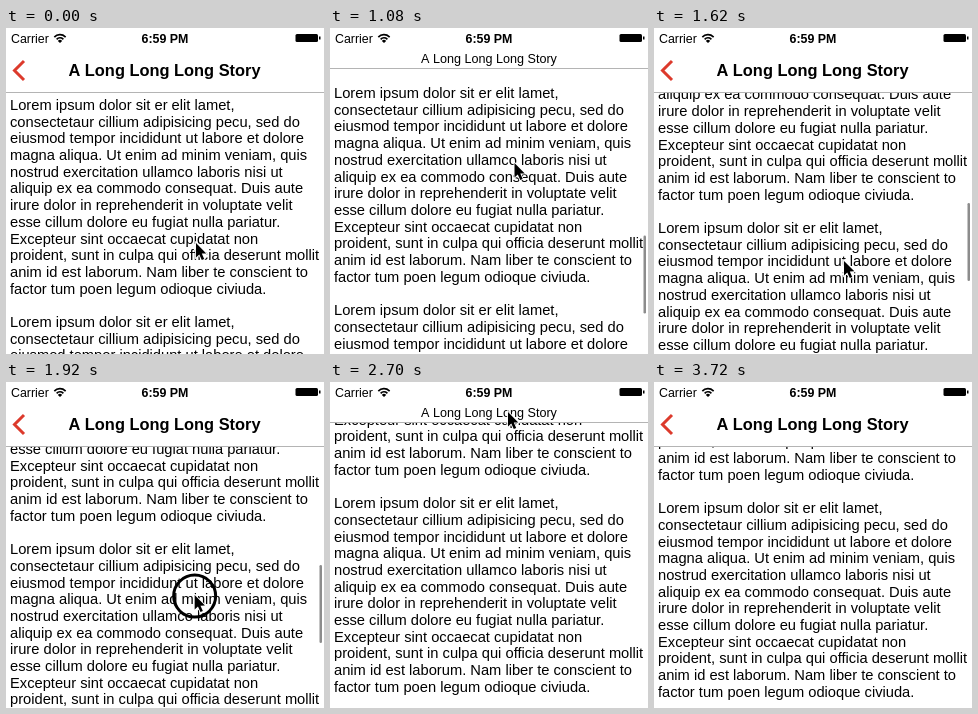
Write an HTML page with a canvas that moves like this. It is 318 px wide and 326 px high and loops after 3960 ms.

```html
<!DOCTYPE html>
<html lang="en">
<head>
<meta charset="utf-8">
<title>Collapsing navigation bar</title>
<style>
html, body { margin: 0; width: 100%; height: 100%; overflow: hidden; background: #fff; }
canvas { display: block; width: 318px; height: 326px; }
</style>
</head>
<body>
<canvas id="stage" width="318" height="326"></canvas>
<script>
const W = 318, H = 326, LOOP = 3960, STEP = 60;
const LINE = 16.7, PARAGRAPH = LINE * 13;
const BAR_OPEN = 64, BAR_CLOSED = 40;
const FONT = '"Liberation Sans", Arial, sans-serif';
const TITLE = 'A Long Long Long Story';
const ctx = document.getElementById('stage').getContext('2d');
const arrow = new Path2D('M0 0V14.5L3.3 11.5L5.8 17L8.2 16L5.8 10.6L10.3 10.4Z');

const story = [
  'Lorem ipsum dolor sit er elit lamet,',
  'consectetaur cillium adipisicing pecu, sed do',
  'eiusmod tempor incididunt ut labore et dolore',
  'magna aliqua. Ut enim ad minim veniam, quis',
  'nostrud exercitation ullamco laboris nisi ut',
  'aliquip ex ea commodo consequat. Duis aute',
  'irure dolor in reprehenderit in voluptate velit',
  'esse cillum dolore eu fugiat nulla pariatur.',
  'Excepteur sint occaecat cupidatat non',
  'proident, sunt in culpa qui officia deserunt mollit',
  'anim id est laborum. Nam liber te conscient to',
  'factor tum poen legum odioque civiuda.'
];

const dragUp = { from: 60, to: 600 };
const dragDown = { from: 1110, to: 1320 };
const flick = { from: 1800, to: 2160 };
const settle = { from: 2940, to: 3360 };

// Progress from 0 to 1 and the easings built on it.
const ramp = (t, from, to) => Math.min(1, Math.max(0, (t - from) / (to - from)));
const easeIn = (t, from, to, power = 2) => ramp(t, from, to) ** power;
const easeOut = (t, from, to) => 1 - (1 - ramp(t, from, to)) ** 2;
const smooth = (t, from, to) => {
  const p = ramp(t, from, to);
  return p * p * (3 - 2 * p);
};

// Baseline of the third paragraph's first line.
function scrollTop(t) {
  return 299
    - 229 * easeIn(t, dragUp.from, 1080, 1.46)
    + 135 * easeOut(t, 1080, 1560)
    - 296 * easeIn(t, flick.from, flick.to)
    - 18 * Math.sin(Math.PI * ramp(t, flick.to, 2640))
    + 5 * smooth(t, settle.from, settle.to);
}

function barBottom(t) {
  const closed = smooth(t, 540, 780) - smooth(t, 1290, 1570)
    + smooth(t, 2000, 2240) - smooth(t, settle.from, 3300);
  return BAR_OPEN - (BAR_OPEN - BAR_CLOSED) * closed;
}

function pointerAt(t) {
  const up = easeIn(t, dragUp.from, dragUp.to, 1.4);
  const down = smooth(t, dragDown.from, dragDown.to);
  const flung = easeIn(t, flick.from, flick.to);
  return {
    x: 190 - 5.5 * (up - down) - 12 * flung,
    y: 215 - 80 * up + 75 * down + 26 * smooth(t, 1400, 1680) - 206 * flung
      - 50 * ramp(t, settle.from, 3120)
  };
}

function text(string, x, y, size, weight = '', align = 'left') {
  ctx.font = `${weight} ${size}px ${FONT}`;
  ctx.textAlign = align;
  ctx.fillStyle = '#000';
  ctx.fillText(string, x, y);
}

function drawStory(top) {
  for (let p = -2; p < 2; p++) {
    story.forEach((line, i) => {
      const y = top + p * PARAGRAPH + i * LINE;
      if (y > 0 && y < H + 20) text(line, 4, Math.round(y), 14.7);
    });
  }
}

function drawIndicator(t, top) {
  ctx.globalAlpha = ramp(t, 60, 120) - ramp(t, 2340, 2580);
  ctx.fillStyle = '#8c8c8c';
  ctx.beginPath();
  ctx.roundRect(313.5, Math.min(183 + (172 - top) * 0.24, 245), 2.5, 78, 1.25);
  ctx.fill();
  ctx.globalAlpha = 1;
}

function drawStatusBar() {
  text('Carrier', 5, 14.5, 12.4);
  text('6:59 PM', 159, 14.5, 12.4, 'bold', 'center');

  ctx.strokeStyle = '#000';
  ctx.lineWidth = 1.7;
  const left = -Math.PI * 0.76, right = -Math.PI * 0.24;
  for (const radius of [4.6, 7.8]) {
    ctx.beginPath();
    ctx.arc(54, 14.5, radius, left, right);
    ctx.stroke();
  }
  ctx.beginPath();
  ctx.moveTo(54, 15);
  ctx.arc(54, 15, 3, left, right);
  ctx.fill();

  ctx.beginPath();
  ctx.roundRect(289.5, 6, 22.5, 8, 1.5);
  ctx.fill();
  ctx.fillRect(313, 8.5, 1.5, 3);
}

function drawBar(bottom) {
  ctx.fillStyle = '#fff';
  ctx.fillRect(0, 0, W, bottom);
  ctx.fillStyle = '#b4b4b4';
  ctx.fillRect(0, Math.round(bottom), W, 1);
  drawStatusBar();

  if (bottom < BAR_OPEN - 2) {
    text(TITLE, 159, 35 + (bottom - BAR_CLOSED) / 2, 12.6, '', 'center');
    return;
  }
  text(TITLE, 158.5, 48, 16.4, 'bold', 'center');
  ctx.strokeStyle = '#dc3a2c';
  ctx.lineWidth = 3;
  ctx.beginPath();
  ctx.moveTo(18, 33);
  ctx.lineTo(8.5, 42.5);
  ctx.lineTo(18, 52);
  ctx.stroke();
}

function drawPointer(t) {
  const { x, y } = pointerAt(t);
  if ([dragUp, dragDown, flick].some(press => t > press.from && t < press.to)) {
    ctx.strokeStyle = '#000';
    ctx.lineWidth = 3;
    ctx.beginPath();
    ctx.arc(x, y + 1, 21, 0, Math.PI * 2);
    ctx.stroke();
  }
  ctx.save();
  ctx.translate(x, y);
  ctx.strokeStyle = '#fff';
  ctx.lineWidth = 1.8;
  ctx.stroke(arrow);
  ctx.fillStyle = '#000';
  ctx.fill(arrow);
  ctx.restore();
}

function draw(now) {
  const t = Math.floor((now % LOOP) / STEP) * STEP;
  const top = scrollTop(t);
  ctx.fillStyle = '#fff';
  ctx.fillRect(0, 0, W, H);
  drawStory(top);
  drawIndicator(t, top);
  drawBar(barBottom(t));
  drawPointer(t);
}

const start = performance.now();
function tick() {
  draw(performance.now() - start);
  requestAnimationFrame(tick);
}
tick();
</script>
</body>
</html>
```
